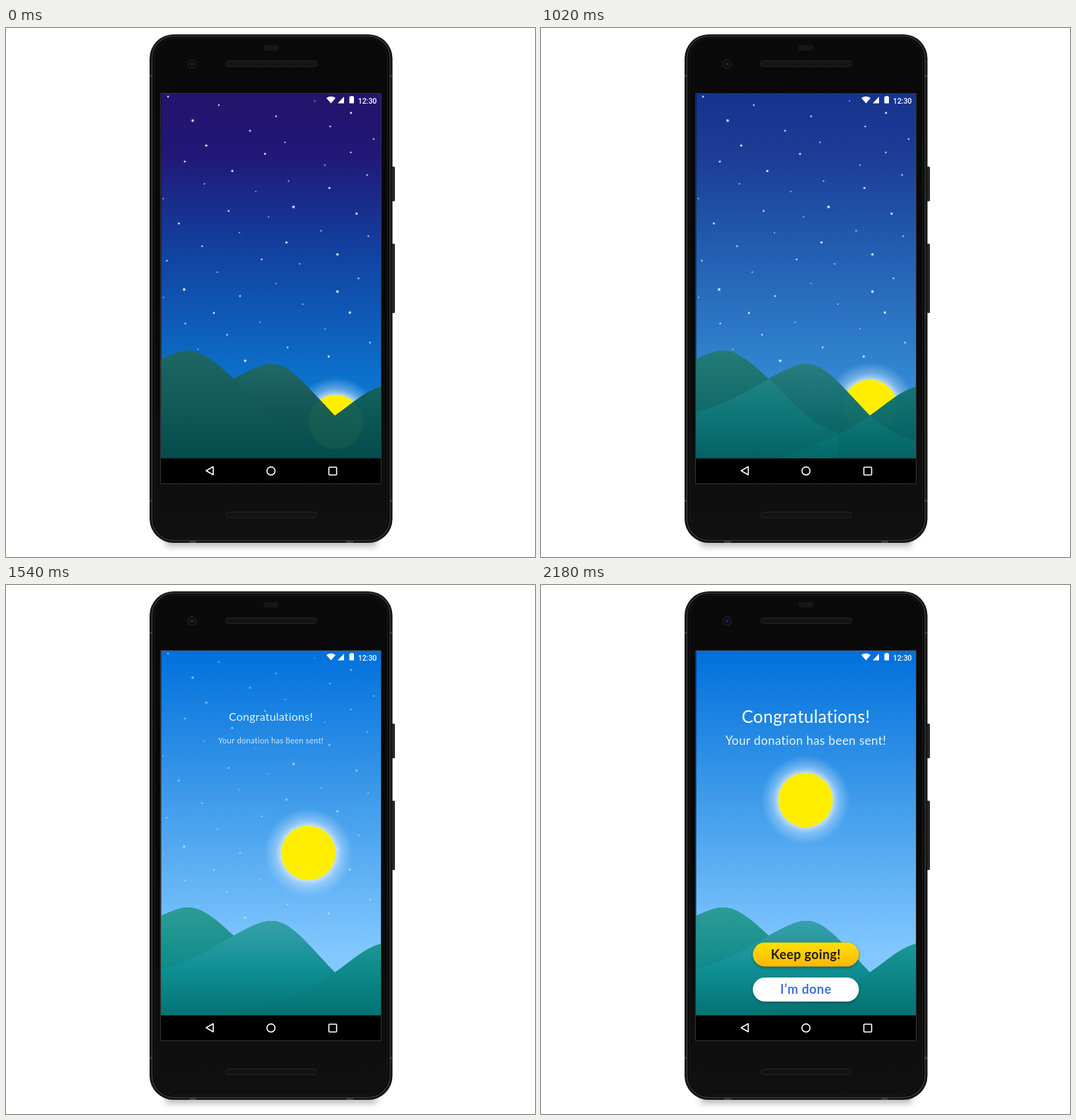
These frames come from a looping animation (748x748 px, 2680 ms). An HTML page with a canvas:

```html
<!DOCTYPE html>
<html lang="en">
<head>
<meta charset="utf-8">
<title>Sunrise donation screen</title>
<style>
html, body { margin: 0; width: 100%; height: 100%; overflow: hidden; background: #fff; }
canvas { display: block; width: 748px; height: 748px; }
</style>
</head>
<body>
<canvas id="stage" width="748" height="748"></canvas>
<script>
const ctx = document.getElementById('stage').getContext('2d');
const LOOP = 2680;
const SCREEN = { x: 219, y: 93, w: 311, h: 516 };
const STAR_COUNT = 55;

const clamp = v => Math.min(1, Math.max(0, v));
const progress = (t, start, length) => clamp((t - start) / length);
const mix = (a, b, u) => a + (b - a) * u;
const easeInOut = u => (1 - Math.cos(Math.PI * u)) / 2;
const easeOut = u => 1 - (1 - u) ** 3;
const random = seed => Math.abs(Math.sin(seed * 127.1) * 43758.5453) % 1;

const hills = {
  left: new Path2D('M219 468C237 460 247 456 257 456C280 456 301 477 322 496C350 521 378 560 420 572V609H219Z'),
  middle: new Path2D('M219 543C262 533 291 513 322 496C346 483 360 475 376 475C402 475 425 506 465 548C482 564 505 577 531 584V609H219Z'),
  right: new Path2D('M330 609C390 590 430 573 465 548C490 531 506 514 531 507V609Z')
};
const hillTops = { left: 456, middle: 475, right: 507 };

// Hills are listed from back to front with their gradient colours
const night = {
  sky: ['#24146c', '#211777', '#123f9d', '#0b78d2'],
  hills: { middle: ['#206866', '#125654', '#054b4c'], left: ['#1f6765', '#125957', '#054b4c'], right: ['#11625f', '#0a5655', '#054b4c'] }
};
const day = {
  sky: ['#0070dc', '#1a82e1', '#409cea', '#82c8ff'],
  hills: { left: ['#2c9d95', '#128c8c', '#047070'], middle: ['#38a0aa', '#109095', '#037272'], right: ['#1d9894', '#0b8586', '#037272'] }
};

function gradient(y0, y1, colors, stops = colors.map((_, i) => i / (colors.length - 1))) {
  const g = ctx.createLinearGradient(0, y0, 0, y1);
  colors.forEach((color, i) => g.addColorStop(stops[i], color));
  return g;
}

function rounded(x, y, w, h, r, fill, stroke, lineWidth = 1) {
  ctx.beginPath();
  ctx.roundRect(x, y, w, h, r);
  if (fill) { ctx.fillStyle = fill; ctx.fill(); }
  if (stroke) { ctx.strokeStyle = stroke; ctx.lineWidth = lineWidth; ctx.stroke(); }
}

function disc(x, y, r, fill) {
  ctx.beginPath();
  ctx.arc(x, y, r, 0, Math.PI * 2);
  ctx.fillStyle = fill;
  ctx.fill();
}

function label(text, x, y, font, color, spacing = 0) {
  ctx.font = font;
  ctx.letterSpacing = spacing + 'px';
  ctx.fillStyle = color;
  ctx.textAlign = 'center';
  ctx.fillText(text, x, y);
}

// Grows whatever is painted from a point, fading it in
function pop(y, u, paint) {
  if (u <= 0) return;
  const scale = easeOut(u);
  ctx.save();
  ctx.translate(374.5, y);
  ctx.scale(scale, scale);
  ctx.globalAlpha = clamp(scale * 1.35);
  paint();
  ctx.restore();
}

function drawPhone() {
  ctx.save();
  ctx.filter = 'blur(5px)';
  ctx.fillStyle = 'rgba(0,0,0,.28)';
  ctx.fillRect(226, 716, 298, 17);
  ctx.restore();

  rounded(545, 196, 5, 49, 1.5, '#2b2b2b');
  rounded(545, 305, 5, 98, 1.5, '#2b2b2b');
  rounded(203, 9, 343.5, 719, 34, '#151515');
  rounded(206.5, 11.5, 336.5, 713, 31, '#080808', '#363636', 1.5);
  rounded(210, 14.5, 329.5, 707, 28, gradient(14, 722, ['#0a0a0a', '#080808', '#101010']), '#1c1c1c');

  ctx.fillStyle = '#383838';
  for (const y of [66, 667]) {
    ctx.fillRect(203, y, 4, 3);
    ctx.fillRect(542, y, 4, 3);
  }
  for (const x of [259, 481]) ctx.fillRect(x, 725, 10, 3);

  rounded(364, 24, 21, 8, 3, '#161616');
  for (const y of [46.5, 684.5]) rounded(310.5, y, 129, 8, 4, '#141414', '#242424');
  disc(263, 51, 7, '#18181b');
  disc(263, 51, 4.5, '#0b0b18');
  disc(263, 51, 2, '#25254f');
  rounded(218.5, 92.5, 312, 552, 0, '#000', '#38322c');
}

function drawSky(scene) {
  ctx.fillStyle = gradient(93, 520, scene.sky, [0, .2, .5, 1]);
  ctx.fillRect(SCREEN.x, SCREEN.y, SCREEN.w, SCREEN.h);
}

function drawHills(scene, alpha) {
  ctx.globalAlpha = alpha;
  for (const [name, colors] of Object.entries(scene.hills)) {
    ctx.fillStyle = gradient(hillTops[name], 609, colors);
    ctx.fill(hills[name]);
  }
  ctx.globalAlpha = 1;
}

// Golden-ratio steps spread the stars evenly, a little jitter breaks the pattern
function drawStars(alpha) {
  for (let i = 0; i < STAR_COUNT; i++) {
    const x = SCREEN.x + SCREEN.w * ((i * .618 + .1 * random(i + 1)) % 1);
    const y = 94 + 375 * i / STAR_COUNT + 10 * random(i + 99);
    const size = random(i + 200);
    ctx.globalAlpha = alpha * .2;
    disc(x, y, mix(1.2, 2.6, size), '#fff');
    ctx.globalAlpha = alpha * mix(.6, 1, size);
    disc(x, y, mix(.7, 1.5, size), '#fff');
  }
  ctx.globalAlpha = 1;
}

// The sun climbs along an arc: steep first, then drifting to the middle
function sunPosition(t) {
  const rise = 1 - (1 - progress(t, 830, 1100) ** 1.8) ** 2;
  const drift = 1 - (1 - rise ** 1.9) ** .75;
  return [mix(466, 374, drift), mix(557, 304, rise)];
}

function drawSun(x, y) {
  const glow = ctx.createRadialGradient(x, y, 36, x, y, 63);
  glow.addColorStop(0, 'rgba(225,240,255,.9)');
  glow.addColorStop(.4, 'rgba(205,230,255,.42)');
  glow.addColorStop(1, 'rgba(180,220,255,0)');
  disc(x, y, 63, glow);
  disc(x, y, 38.5, '#ffee00');
}

function drawStatus() {
  ctx.fillStyle = '#fff';
  ctx.fill(new Path2D('M459.5 106.5L453 99Q459.5 94.5 466 99ZM469 106.5H478V97Z'));
  ctx.fill(new Path2D('M487.5 96h3v1h1.5v9.5h-6.5v-9.5h2Z'));
  label('12:30', 511, 106.5, '500 10.5px Roboto, sans-serif', '#fff');
}

function drawNavigation() {
  ctx.fillStyle = '#000';
  ctx.fillRect(219, 608.5, 311, 35.5);
  ctx.strokeStyle = '#fff';
  ctx.lineWidth = 1.6;
  ctx.lineJoin = 'round';
  ctx.stroke(new Path2D('M283 626L293 620.3V631.7Z'));
  rounded(369, 620.6, 11.4, 11.4, 5.7, null, '#fff', 1.6);
  rounded(456.5, 621, 11, 11, 1, null, '#fff', 1.6);
}

function drawButton(y, u, text, fill, color) {
  pop(y, u, () => {
    ctx.shadowColor = 'rgba(0,40,40,.5)';
    ctx.shadowBlur = 4;
    ctx.shadowOffsetY = 1.5;
    rounded(-75, -17, 150, 34, 17, fill);
    ctx.shadowColor = 'transparent';
    label(text, 0, 6, 'bold 18px Lato, sans-serif', color, .4);
  });
}

function draw(t) {
  ctx.fillStyle = '#fff';
  ctx.fillRect(0, 0, 748, 748);
  drawPhone();

  ctx.save();
  ctx.beginPath();
  ctx.rect(219.5, 93, 310.5, 516);
  ctx.clip();

  const daylight = easeInOut(progress(t, 820, 480));
  const dimness = .15 * daylight * (1 - progress(t, 1220, 300));
  drawSky(night);
  ctx.globalAlpha = daylight;
  drawSky(day);
  ctx.globalAlpha = dimness;
  ctx.fillStyle = '#000';
  ctx.fillRect(SCREEN.x, SCREEN.y, SCREEN.w, SCREEN.h);
  drawStars(1 - progress(t, 1120, 840));

  const [x, y] = sunPosition(t);
  drawSun(x, y);
  drawHills(night, 1);
  ctx.globalAlpha = .04 * (1 - daylight);
  disc(x, y, 38.5, '#ffee00');
  drawHills(day, daylight);

  const textIn = progress(t, 1386, 520);
  pop(187, textIn, () => label('Congratulations!', 0, 8, '24.5px Lato, sans-serif', '#fff', .3));
  pop(220, textIn, () => label('Your donation has been sent!', 0, 6, '17px Lato, sans-serif', 'rgba(255,255,255,.9)', .4));
  drawButton(572, progress(t, 1553, 340), 'I’m done', '#fff', '#4470d8');
  const gold = gradient(-17, 17, ['#ffe000', '#fbb800']);
  drawButton(522.5, progress(t, 1830, 340), 'Keep going!', gold, '#1c1c1c');
  drawStatus();
  ctx.restore();

  drawNavigation();
}

function tick() {
  draw(performance.now() % LOOP);
  requestAnimationFrame(tick);
}
tick();
</script>
</body>
</html>
```
